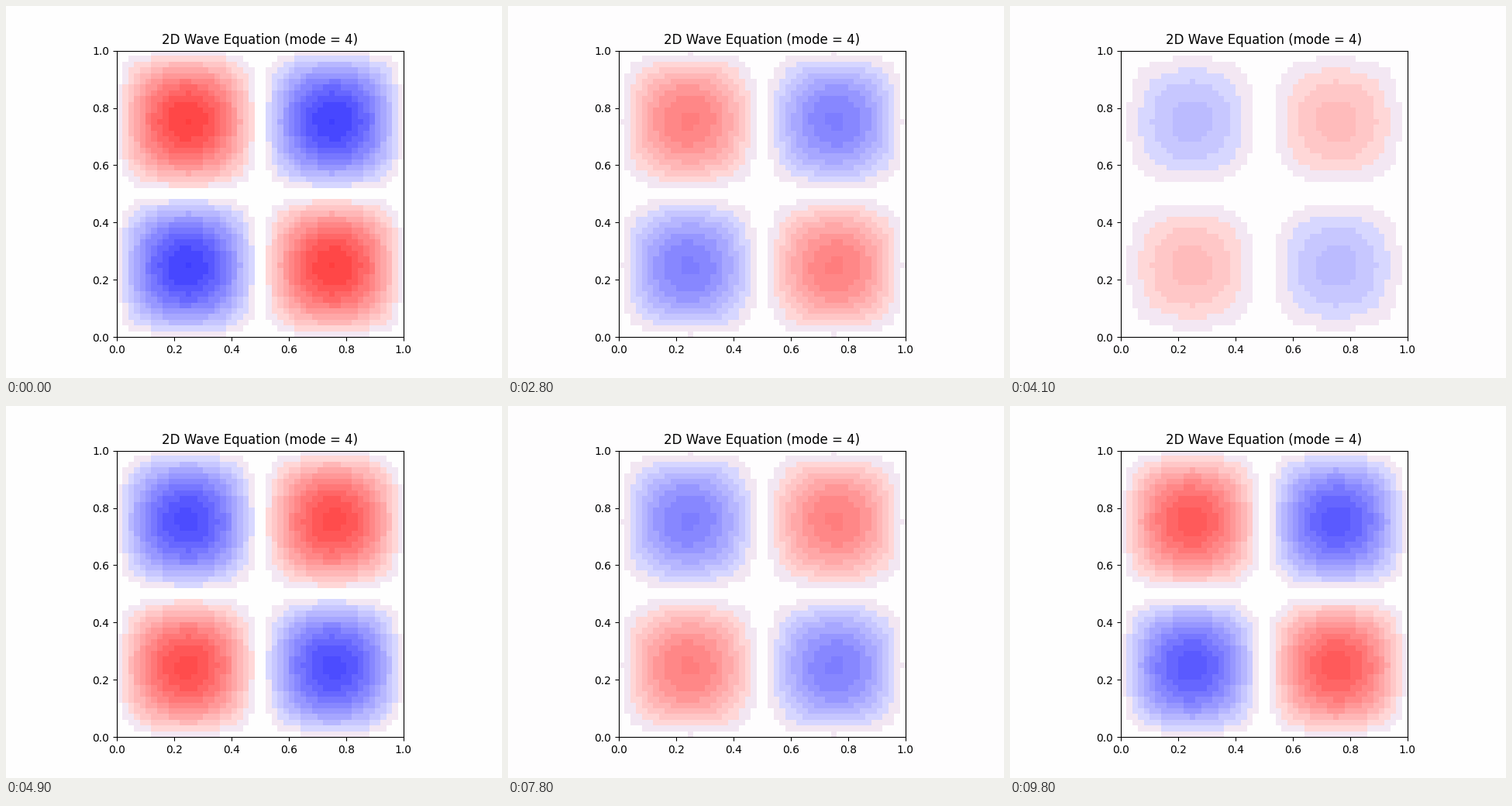
A matplotlib script for the animation above (9.9 s loop, 640 by 480 pixels).

```python
import numpy as np
import matplotlib.pyplot as plt
from matplotlib.animation import FuncAnimation

W, H, DPI = 640, 480, 100
N = 50            # interior grid points per side
FRAMES = 99
PERIOD = 100      # frames per oscillation
PEAK = 11.5       # frame position of the first maximum

# Eigenmode (2, 2) of the discrete Laplacian, scaled to a maximum of 1
wave = np.sin(2 * np.pi * np.arange(1, N + 1) / (N + 1))
mode = -np.outer(wave, wave)
mode /= np.abs(mode).max()

fig, ax = plt.subplots(figsize=(W / DPI, H / DPI), dpi=DPI)
ax.set_title("2D Wave Equation (mode = 4)")
image = ax.imshow(np.full((N, N, 3), 255, np.uint8), origin="lower",
                  extent=(0, 1, 0, 1), interpolation="nearest")

AXES_SIDE = 0.77 * H
CELL_AREA = (AXES_SIDE / N) ** 2
MARGIN_AREA = W * H - AXES_SIDE ** 2


def blue_white_red(u):
    """Map values in [-1, 1] to 256 diverging colours."""
    idx = np.clip(np.floor((u + 1) * 128), 0, 255).astype(int)
    fade = 2 * np.minimum(idx, 255 - idx)
    red = np.where(idx < 128, fade, 255)
    blue = np.where(idx < 128, 255, fade)
    return np.stack([red, fade, blue], axis=-1)


def band_colours(rgb):
    """Flatten colours into coarse bands; return the bands and the paper tone."""
    r, g, b = np.moveaxis(rgb, -1, 0)
    key = (r >> 5) * 128 + (g >> 4) * 8 + (b >> 5)
    top = 7 * 128 + 15 * 8 + 7
    out = np.empty(rgb.shape, np.uint8)
    for k in np.unique(key):
        if k != top:
            out[key == k] = rgb[key == k].mean(axis=0).astype(np.uint8)
    # The lightest band shares its tone with the page around the plot
    light = rgb[key == top]
    total = light.sum(axis=0) * CELL_AREA + 255 * MARGIN_AREA
    paper = np.floor(total / (len(light) * CELL_AREA + MARGIN_AREA))
    out[key == top] = paper.astype(np.uint8)
    return out, paper / 255


def update(n):
    u = mode * np.cos(2 * np.pi * (n - PEAK) / PERIOD)
    bands, paper = band_colours(blue_white_red(u))
    image.set_data(bands)
    fig.set_facecolor(tuple(paper))
    ax.set_facecolor(tuple(paper))
    return [image]


anim = FuncAnimation(fig, update, frames=FRAMES, interval=100,
                     init_func=lambda: update(0), repeat=True,
                     repeat_delay=0, blit=False)
plt.show()
```
